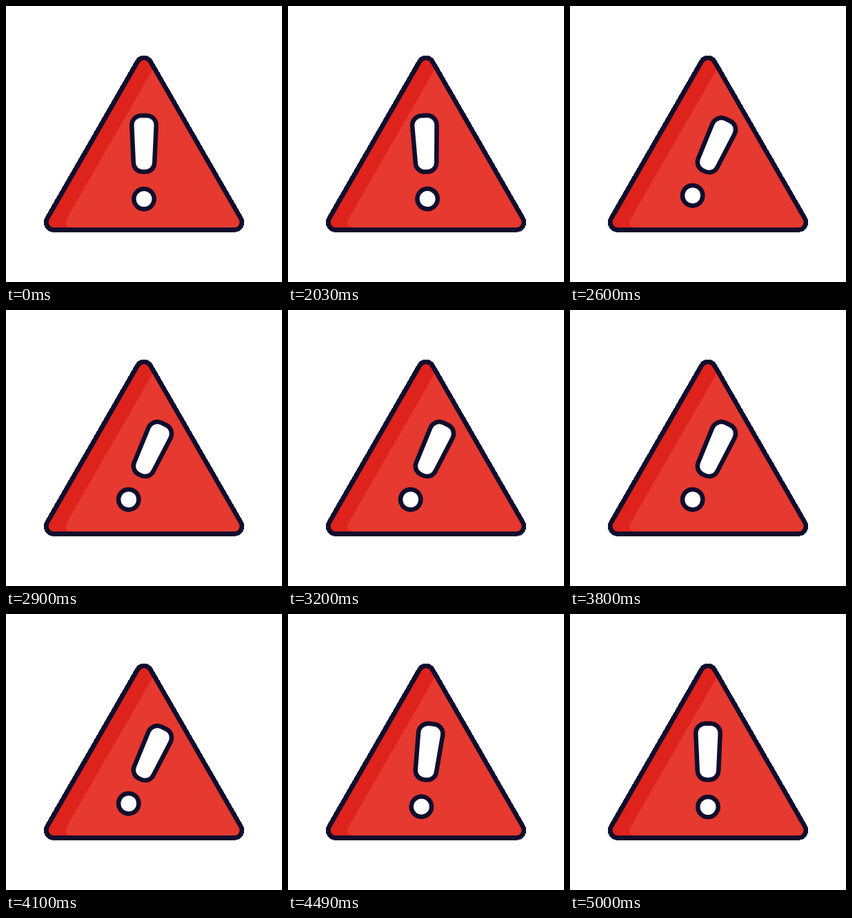
An HTML page that plays this animation: 400 px wide and 400 px high, repeating every 5030 ms.

```html
<!DOCTYPE html>
<html lang="en">
<head>
<meta charset="utf-8">
<title>Warning sign</title>
<style>
  html, body { margin: 0; width: 100%; height: 100%; overflow: hidden; background: #fff; }
  svg { display: block; width: 100%; height: 100%; }
</style>
</head>
<body>
<svg viewBox="0 0 400 400">
  <defs>
    <path id="triangle" d="M200 86 L331 313.5 H69 Z" stroke-linejoin="round"/>
    <mask id="face"><use href="#triangle" fill="#fff" stroke="#fff" stroke-width="14.8"/></mask>
  </defs>
  <use href="#triangle" fill="#100d2d" stroke="#100d2d" stroke-width="28.6" shape-rendering="crispEdges"/>
  <use href="#triangle" fill="#de231d" stroke="#de231d" stroke-width="14.8"/>
  <g mask="url(#face)">
    <use href="#triangle" x="24.5" fill="#e6392f" stroke="#e6392f" stroke-width="14.8"/>
  </g>
  <g id="mark" fill="#fff" stroke="#100d2d" stroke-width="6.5">
    <path d="M196 158.7 H204 A14 14 0 0 1 217.7 173.4 L215.2 227.6 A13.3 13.3 0 0 1 202 240.3 H198 A13.3 13.3 0 0 1 184.8 227.6 L182.3 173.4 A14 14 0 0 1 196 158.7 Z"/>
    <circle cx="200" cy="279.6" r="14.7"/>
  </g>
</svg>
<script>
  const LOOP = 5030, START = 2000, END = 5000, STEP = 30;
  const FIRST_PEAK = 2177, SWING = 150, SWINGS = 17, PEAK = 30;
  const mark = document.getElementById('mark');

  // Even swings to both sides, then a short damped return to upright.
  const keys = [{ time: START, angle: 0 }];
  for (let i = 0; i < SWINGS; i++) {
    keys.push({ time: FIRST_PEAK + i * SWING, angle: i % 2 ? PEAK : -PEAK });
  }
  keys.push(
    { time: FIRST_PEAK + SWINGS * SWING, angle: 10 },
    { time: 4865, angle: -5 },
    { time: END, angle: 0 }
  );

  const smooth = u => u * u * (3 - 2 * u);

  function angleAt(time) {
    const t = START + Math.floor((time - START) / STEP) * STEP;
    if (t <= START || t >= END) return 0;
    const i = keys.findIndex(key => key.time > t);
    const from = keys[i - 1], to = keys[i];
    const u = (t - from.time) / (to.time - from.time);
    return from.angle + (to.angle - from.angle) * smooth(u);
  }

  function render(time) {
    mark.setAttribute('transform', `rotate(${angleAt(time % LOOP)} 200 226.6)`);
  }

  const origin = performance.now();
  function tick() {
    render(performance.now() - origin);
    requestAnimationFrame(tick);
  }
  tick();
</script>
</body>
</html>
```
